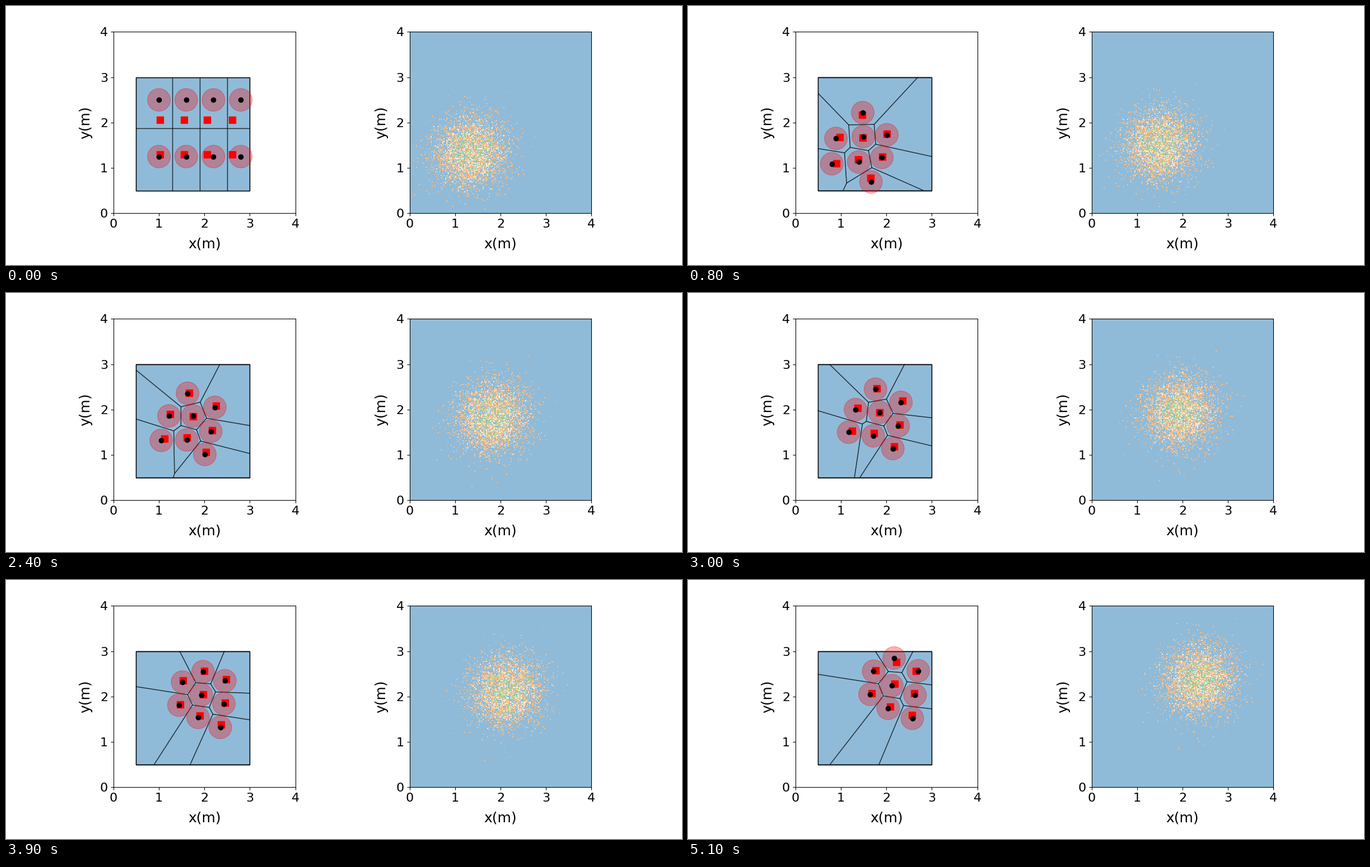
A matplotlib script for the animation above (5.2 s loop, 1207 px wide and 464 px high).

```python
import numpy as np
import matplotlib.pyplot as plt
from matplotlib.animation import FuncAnimation
from matplotlib.colors import ListedColormap
from matplotlib.patches import Circle, Polygon, Rectangle

W, H, DPI = 1207, 464, 100
FRAMES, INTERVAL = 52, 100
LO, HI = 0.5, 3.0
SIGMA = 0.387
RADIUS = 0.25
BLUE = "#8fbbd9"

# Robot positions in metres at a few moments of the run
KEY_TIMES = [0, 8, 16, 24, 30, 39, 51]
PATHS = np.array([
    [(2.2, 2.5), (1.48, 2.22), (1.47, 2.24), (1.63, 2.36), (1.76, 2.45), (1.97, 2.55), (2.17, 2.85)],
    [(1.0, 2.5), (0.89, 1.65), (1.10, 1.70), (1.22, 1.86), (1.32, 2.00), (1.52, 2.32), (1.72, 2.56)],
    [(1.6, 2.5), (1.49, 1.69), (1.63, 1.73), (1.75, 1.86), (1.85, 1.94), (1.93, 2.04), (2.12, 2.24)],
    [(2.8, 2.5), (2.01, 1.73), (2.11, 1.91), (2.23, 2.05), (2.32, 2.16), (2.45, 2.35), (2.70, 2.57)],
    [(1.0, 1.25), (0.80, 1.09), (0.89, 1.16), (1.05, 1.32), (1.17, 1.50), (1.44, 1.81), (1.64, 2.05)],
    [(1.6, 1.25), (1.39, 1.13), (1.47, 1.23), (1.61, 1.33), (1.71, 1.42), (1.86, 1.54), (2.04, 1.74)],
    [(2.8, 1.25), (1.90, 1.23), (1.97, 1.34), (2.14, 1.52), (2.26, 1.64), (2.43, 1.84), (2.63, 2.03)],
    [(2.2, 1.25), (1.66, 0.69), (1.82, 0.85), (2.01, 1.01), (2.14, 1.14), (2.35, 1.32), (2.57, 1.52)],
])
COUNT = len(PATHS)

rng = np.random.default_rng(7)
cloud = rng.normal(0, SIGMA, (5000, 2))
cloud = cloud[np.hypot(*cloud.T) < 1.4]
strays = [(0.77, 1.33), (-0.47, -1.53), (0.07, -1.45), (1.40, 0.33), (-1.24, -0.95)]
cloud = np.vstack([cloud, strays])

axis = np.linspace(LO, HI, 101)
axis = (axis[:-1] + axis[1:]) / 2
grid = np.stack(np.meshgrid(axis, axis), axis=-1).reshape(-1, 2)


def cloud_center(frame):
    return 1.35 + 0.02 * frame


def robot_positions(frame):
    # Fast settling at first, then a steady drift with the cloud
    time = frame
    if frame < KEY_TIMES[1]:
        time = 8 * (1 - 0.6 ** frame) / (1 - 0.6 ** 8)
    return np.array([[np.interp(time, KEY_TIMES, path[:, k]) for k in (0, 1)]
                     for path in PATHS])


def clip(poly, point, normal):
    """Keep the part of poly behind the line through point."""
    side = [np.dot(v - point, normal) for v in poly]
    result = []
    for i, vertex in enumerate(poly):
        j = (i + 1) % len(poly)
        if side[i] <= 0:
            result.append(vertex)
        if side[i] * side[j] < 0:
            result.append(vertex + (poly[j] - vertex) * side[i] / (side[i] - side[j]))
    return result


def voronoi_cells(sites):
    cells = []
    for i, site in enumerate(sites):
        cell = [np.array(v) for v in ((LO, LO), (HI, LO), (HI, HI), (LO, HI))]
        for j, other in enumerate(sites):
            if i != j:
                cell = clip(cell, (site + other) / 2, other - site)
        cells.append(np.array(cell))
    return cells


def centroids(sites, center):
    weight = np.exp(-((grid - center) ** 2).sum(axis=1) / (2 * SIGMA ** 2))
    owner = ((grid[:, None] - sites) ** 2).sum(axis=2).argmin(axis=1)
    total = np.bincount(owner, weight, COUNT)
    return np.column_stack([np.bincount(owner, weight * grid[:, k], COUNT) / total
                            for k in (0, 1)])


def density(frame):
    x, y = (cloud + cloud_center(frame)).T
    counts, _, _ = np.histogram2d(y, x, bins=200, range=[(0, 4), (0, 4)])
    return counts


plt.rcParams["font.family"] = "DejaVu Sans"
# The small margin guards against rounding down to one pixel less
fig, (left, right) = plt.subplots(1, 2, dpi=DPI,
                                  figsize=((W + 0.01) / DPI, (H + 0.01) / DPI))
fig.subplots_adjust(left=0.125, right=0.9, bottom=0.2, top=0.9, wspace=0.3)

cmap = ListedColormap([BLUE, "#ffbf86", "#f8ead9", "#95cf95"])
image = right.imshow(density(0), origin="lower", extent=(0, 4, 0, 4), cmap=cmap,
                     vmin=-0.5, vmax=3.5, interpolation="nearest")

for ax in (left, right):
    ax.set(xlim=(0, 4), ylim=(0, 4), aspect="equal", xticks=range(5), yticks=range(5))
    ax.tick_params(labelsize=16)
    ax.set_xlabel("x(m)", fontsize=18, labelpad=10)
    ax.set_ylabel("y(m)", fontsize=18, labelpad=10)

left.add_patch(Rectangle((LO, LO), HI - LO, HI - LO, fc=BLUE, ec="black", lw=1))
cell_patches = [left.add_patch(Polygon([(0, 0), (1, 0), (0, 1)], fill=False,
                                       ec="black", alpha=0.5, lw=1, zorder=2))
                for _ in range(COUNT)]
discs = [left.add_patch(Circle((0, 0), RADIUS, color="red", alpha=0.3, lw=1, zorder=3))
         for _ in range(COUNT)]
targets, = left.plot([], [], "s", color="red", ms=8, zorder=4)
robots, = left.plot([], [], "o", color="black", ms=6, zorder=5)


def update(frame):
    sites = robot_positions(frame)
    for patch, cell in zip(cell_patches, voronoi_cells(sites)):
        patch.set_xy(cell)
    for disc, site in zip(discs, sites):
        disc.center = tuple(site)
    targets.set_data(*centroids(sites, cloud_center(frame)).T)
    robots.set_data(*sites.T)
    image.set_data(density(frame))
    return [*cell_patches, *discs, targets, robots, image]


anim = FuncAnimation(fig, update, frames=FRAMES, interval=INTERVAL,
                     repeat=True, repeat_delay=0)
plt.show()
```
